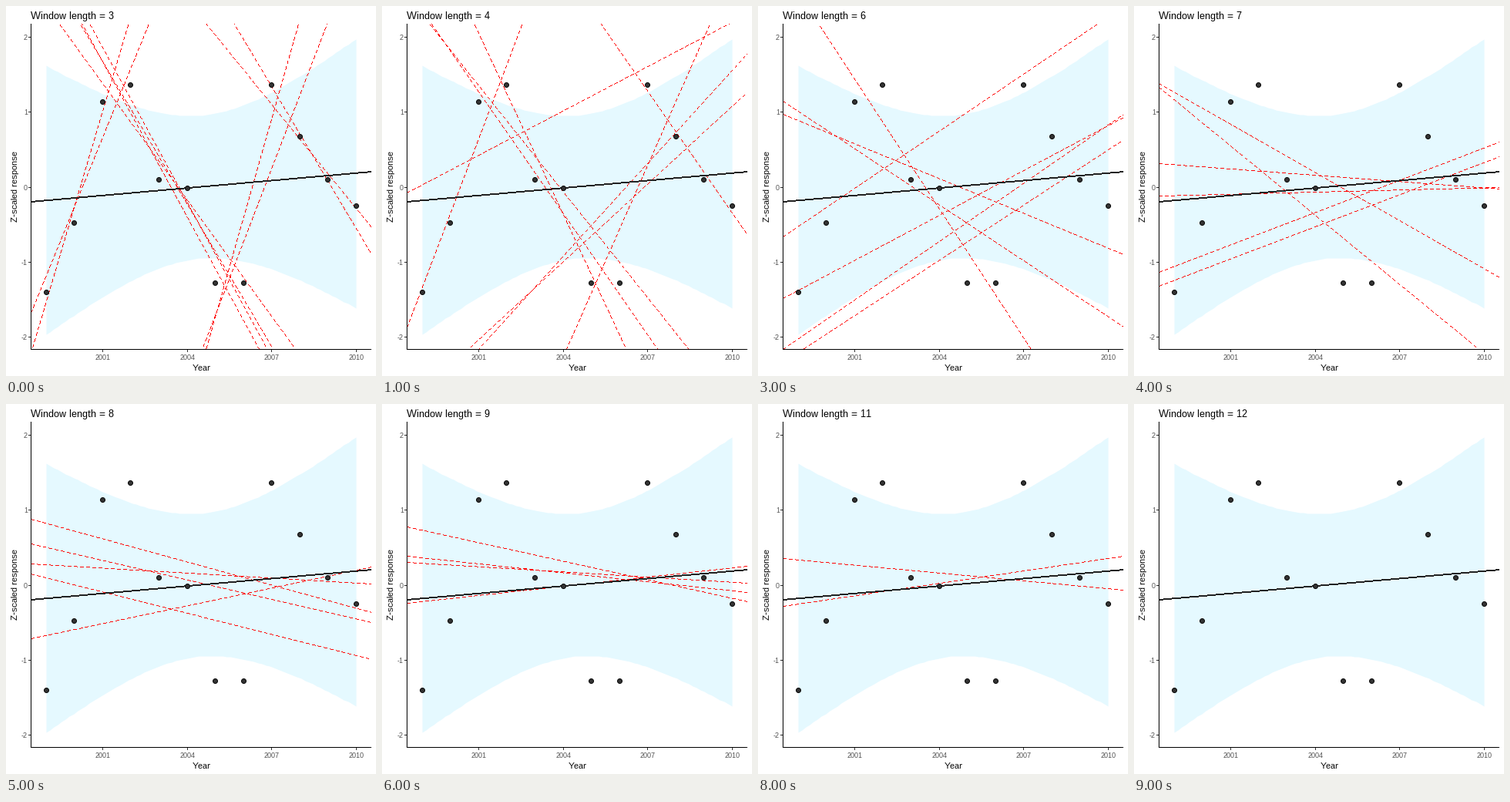
A matplotlib script for the animation above (10000 ms loop, 480 by 480 pixels).

```python
import numpy as np
import matplotlib.pyplot as plt
from matplotlib.animation import FuncAnimation
from matplotlib.patches import Circle, Rectangle

plt.rcParams.update({
    "font.family": "Liberation Sans",
    "text.hinting": "native",
    "text.hinting_factor": 1,
})

SIZE = 480
PT = 0.72  # points per pixel at 100 dpi
LEFT, RIGHT, TOP, BOTTOM = 33, 474, 23, 445  # panel, in whole pixels
SPAN = np.array([1998.45, 2010.55])
DASH, PERIOD = 5, 8
T_CRIT = 3.169  # 99 % two-sided, 10 degrees of freedom
FIRST_WINDOW = 3
RED = (255, 0, 0, 255)
DARK = (34, 34, 34, 255)

years = np.arange(1999, 2011)
resp = np.array([-1.40, -0.48, 1.135, 1.36, 0.10, -0.015,
                 -1.28, -1.28, 1.36, 0.675, 0.10, -0.25])
n = len(years)


def px(year):
    return np.floor(52.4 + 36.53 * (np.asarray(year) - 1999))


def py(value):
    return np.floor(235.2 - 97.35 * np.asarray(value))


def fit(x, y):
    """Least-squares slope and centre of a set of points."""
    dx = x - x.mean()
    return (dx * y).sum() / (dx ** 2).sum(), x.mean(), y.mean()


def trend(x, model):
    slope, xm, ym = model
    return ym + slope * (x - xm)


def draw_trend(canvas, model, color, dashed=True, thick=1):
    """Rasterise a trend line without smoothing, clipped to the panel."""
    (x0, x1), (y0, y1) = px(SPAN), py(trend(SPAN, model))
    steps = int(max(abs(x1 - x0), abs(y1 - y0)))
    t = np.linspace(0, 1, steps + 1)
    x = np.rint(x0 + t * (x1 - x0)).astype(int)
    y = np.rint(y0 + t * (y1 - y0)).astype(int)
    keep = (x >= LEFT) & (x < RIGHT) & (y >= TOP) & (y < BOTTOM)
    if dashed:
        keep &= (t * np.hypot(x1 - x0, y1 - y0) + 0.5) % PERIOD < DASH
    for k in range(thick):
        canvas[y[keep] - k, x[keep]] = color


fig = plt.figure(figsize=(4.8, 4.8), dpi=100, facecolor="white")
ax = fig.add_axes([0, 0, 1, 1])
ax.axis("off")


def box(x, y, w, h, color):
    ax.add_patch(Rectangle((x, y), w, h, fc=color, lw=0, zorder=5))


def label(x, y, s, size, color="black", **kw):
    return ax.text(x, y, s, fontsize=size * PT, color=color, **kw)


# Confidence band of the overall trend
overall = fit(years, resp)
grid = np.linspace(1999, 2010, 80)
dev = years - years.mean()
sigma = np.sqrt(((resp - trend(years, overall)) ** 2).sum() / (n - 2))
half = T_CRIT * sigma * np.sqrt(
    1 / n + (grid - years.mean()) ** 2 / (dev ** 2).sum())
mid = trend(grid, overall)
ax.fill_between(px(grid), py(mid - half), py(mid + half),
                color="#E5F9FF", lw=0, zorder=1)

# Trend lines share one pixel layer; the points lie above it
blank = np.zeros((SIZE, SIZE, 4), np.uint8)
layer = ax.imshow(blank, extent=(0, SIZE, SIZE, 0), aspect="auto",
                  interpolation="nearest", zorder=2)
ax.set_xlim(0, SIZE)
ax.set_ylim(SIZE, 0)
for x, y in zip(px(years), py(resp)):
    ax.add_patch(Circle((x + 0.5, y + 0.5), 3, fc="#333333", ec="#0A0A0A",
                        lw=PT, zorder=4))

# Axes
box(LEFT - 1, TOP, 1, BOTTOM - TOP + 1, "black")
box(LEFT - 1, BOTTOM, RIGHT - LEFT + 1, 1, "black")
for year in range(2001, 2011, 3):
    x = px(year)
    box(x, BOTTOM + 1, 1, 3, "#333333")
    label(x + 0.5, 459, str(year), 9, "#4D4D4D", ha="center")
for value in range(-2, 3):
    y = py(value)
    box(LEFT - 4, y, 3, 1, "#333333")
    label(28, y + 4, str(value), 9, "#4D4D4D", ha="right")
label(253.3, 473, "Year", 11, ha="center")
label(15, 234, "Z-scaled response", 11, rotation=90,
      rotation_mode="anchor", ha="center")
title = label(32, 17, "", 13)


def update(frame):
    width = FIRST_WINDOW + frame
    title.set_text(f"Window length = {width}")
    canvas = blank.copy()
    for start in range(n - width + 1):
        part = slice(start, start + width)
        draw_trend(canvas, fit(years[part], resp[part]), RED)
    draw_trend(canvas, overall, DARK, dashed=False, thick=2)
    layer.set_data(canvas)
    return [title, layer]


anim = FuncAnimation(fig, update, frames=n - FIRST_WINDOW + 1,
                     interval=1000, repeat=True, repeat_delay=0)
plt.show()
```
